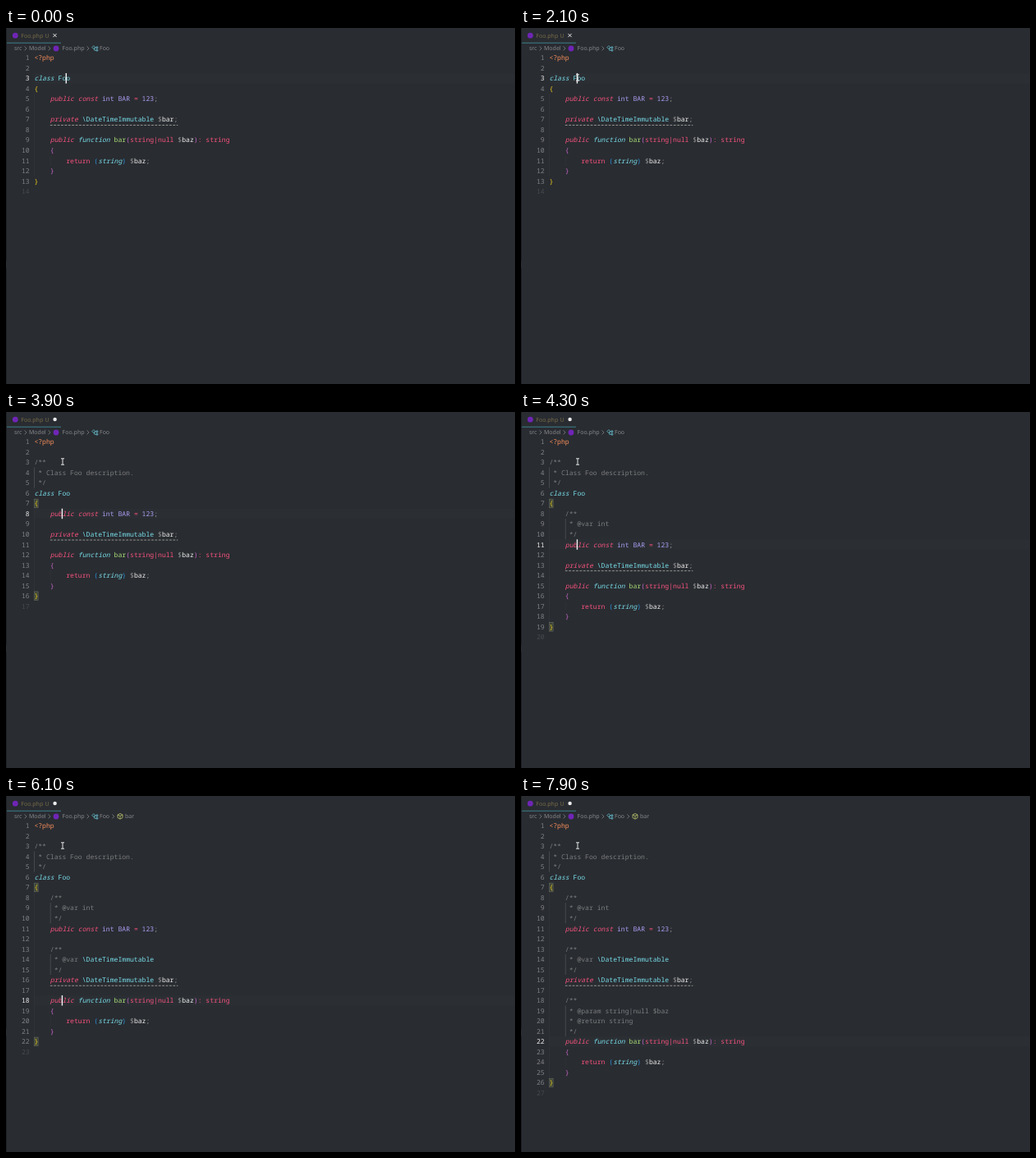
An HTML page for the animation above (8000 ms loop, 620x434 px).

```html
<!DOCTYPE html>
<html lang="en">
<head>
<meta charset="utf-8">
<title>Doc block editor</title>
<style>
  html, body { margin: 0; width: 100%; height: 100%; overflow: hidden; background: #292c31; }
  svg { display: block; width: 620px; height: 434px; text-rendering: geometricPrecision; }
  .code text { font: 8.1px "Noto Sans Mono", "DejaVu Sans Mono", monospace; }
  .code .it { font-style: italic; }
  .ui text { font: 7px "Noto Sans", "Open Sans", sans-serif; fill: #85878a; }
  .ui .file { fill: #776b48; }
  .ui path { fill: none; stroke: #85878a; stroke-width: .8; }
</style>
</head>
<body>
<svg viewBox="0 0 620 434">
  <rect width="620" height="434" fill="#292c31"/>
  <path d="M.5 0V284M.5 293V434" stroke="#1d2024"/>
  <g class="ui">
    <rect x="1" y="17.7" width="66" height="1" fill="#3c7f8b"/>
    <circle cx="11.3" cy="9.2" r="3.4" fill="#6f25b5"/>
    <text class="file" x="18.3" y="11.7">Foo.php</text>
    <text class="file" x="47.5" y="11.7">U</text>
    <path id="close" d="M57.4 6.9l4.2 4.2m0-4.2l-4.2 4.2" style="stroke:#e6e6e6;stroke-width:1"/>
    <circle id="dirty" cx="59.6" cy="9" r="2.2" fill="#ececec"/>
    <text x="10" y="27.4">src</text>
    <text x="28" y="27.4">Model</text>
    <circle cx="61" cy="25" r="3.4" fill="#6f25b5"/>
    <text x="68.6" y="27.4">Foo.php</text>
    <text x="114" y="27.4">Foo</text>
    <path d="M22.6 22.4l2.4 2.5-2.4 2.5M51.6 22.4l2.4 2.5-2.4 2.5M98.6 22.4l2.4 2.5-2.4 2.5"/>
    <path d="M104.8 23.6l2-2 1.8 1.8-2 2zM108 24h2M107.6 24v3.2h2.4M110 22.9h1.8v1.8h-1.8zM110 26.2h1.8v1.8h-1.8z" style="stroke:#66bccb"/>
    <g id="member">
      <path d="M129.4 22.4l2.4 2.5-2.4 2.5"/>
      <path d="M139 21.4l3 1.5v3.6l-3 1.6-3-1.6v-3.6zM136 22.9l3 1.5 3-1.5M139 24.4v3.7" style="stroke:#b9c46c"/>
      <text x="145" y="27.4">bar</text>
    </g>
  </g>
  <g id="code" class="code"></g>
  <rect id="caret" width="1.4" height="12.53" fill="#f4f4f4"/>
  <path id="mouse" d="M-2-3.7H2M0-3.7V3.7M-2 3.7H2" fill="none" stroke="#e2e2e2"/>
</svg>
<script>
const LOOP = 8000, LEFT = 34.4, CHAR = 4.86, TOP = 30, ROW = 12.53, BASE = 9.2;
const $ = id => document.getElementById(id);
const colX = col => LEFT + col * CHAR;
const rowY = row => TOP + (row - 1) * ROW;

// "~x" switches to style x; capitals are italic
const INK = {
  o: '#f58e5c', c: '#78dce8', C: '#78dce8', p: '#f6527c', P: '#f6527c', u: '#ab9df2',
  n: '#a9dc76', g: '#909192', w: '#f0f0ee', y: '#f2cf1d', m: '#c766c8', b: '#2c93de', d: '#7b7d7e'
};
const SOURCE = [
  '~o<?php', '', '~Cclass ~cFoo', '~y{',
  '    ~Ppublic const ~uint BAR ~p= ~u123~g;', '',
  '    ~Pprivate ~c\\DateTimeImmutable ~g$~wbar~g;', '',
  '    ~Ppublic ~Cfunction ~nbar~m(~pstring|null ~g$~wbaz~m)~p: string',
  '    ~m{', '        ~preturn ~b(~Cstring~b) ~g$~wbaz~g;', '    ~m}', '~y}', ''
];
const doc = (pad, ...body) =>
  ['/**', ...body.map(s => ' * ' + s), ' */'].map(s => {
    const indent = s.length - s.trimStart().length;
    return pad + ' '.repeat(indent) + '~d' + s.trimStart();
  });
const INSERTS = [
  { at: 3000, row: 3, lines: doc('', 'Class Foo description.') },
  { at: 4300, row: 8, lines: doc('    ', '@var int') },
  { at: 5300, row: 13, lines: doc('    ', '@var ~c\\DateTimeImmutable') },
  { at: 7100, row: 18, lines: doc('    ', '@param string|null $baz', '@return string') }
];
// time, row, column
const MOVES = [
  [-350, 3, 8], [2050, 3, 7], [3000, 6, 7], [3700, 7, 1], [3900, 8, 7], [4300, 11, 7],
  [4700, 12, 0], [4900, 13, 7], [5300, 16, 7], [5700, 17, 0], [5900, 18, 7], [7100, 22, 7]
];

const clamp = v => Math.min(1, Math.max(0, v));
const ease = v => { v = clamp(v); return v * v * (3 - 2 * v); };
const escape = s => s.replace(/&/g, '&amp;').replace(/</g, '&lt;');
const label = (x, y, fill, s, extra = '') =>
  `<text x="${x.toFixed(2)}" y="${y.toFixed(2)}" fill="${fill}" ${extra}>${escape(s)}</text>`;

function linesAt(t) {
  const lines = [...SOURCE];
  for (const ins of INSERTS) if (t >= ins.at) lines.splice(ins.row - 1, 0, ...ins.lines);
  return lines;
}

function drawLine(line, y) {
  let col = 0, out = '';
  line.split('~').forEach((part, i) => {
    const style = part[0], s = i ? part.slice(1) : part;
    if (s.trim()) out += label(colX(col), y, INK[style], s, /[A-Z]/.test(style) ? 'class="it"' : '');
    col += s.length;
  });
  return out;
}

function drawGuides(line, y, inside) {
  const indent = line ? line.search(/\S/) : inside ? 4 : 0;
  let out = '';
  for (let c = 0; c < indent; c += 4) {
    const bright = indent % 4 && c + 4 > indent;
    out += `<rect x="${colX(c)}" y="${y}" width=".6" height="${ROW}" fill="${bright ? '#5a5d60' : '#34373c'}"/>`;
  }
  return out;
}

function drawCode(t, active) {
  const lines = linesAt(t), last = lines.length, open = lines.indexOf('~y{') + 1, shut = last - 1;
  let out = `<rect x="${LEFT}" y="${rowY(active)}" width="586" height="${ROW}" fill="#2b2f34"/>`;
  lines.forEach((line, i) => {
    const row = i + 1, y = rowY(row), no = String(row);
    const ink = row === active ? '#ededed' : row === last ? '#474a4e' : '#808285';
    out += drawGuides(line, y, row > open && row < shut);
    if (t >= 3700 && (row === open || row === shut))
      out += `<rect x="${LEFT + .2}" y="${y + 1}" width="4.5" height="10.6" fill="#3b4437" stroke="#6b6d60" stroke-width=".6"/>`;
    out += label(28.7, y + BASE, ink, no, 'text-anchor="end"') + drawLine(line, y + BASE);
    if (line.includes('private'))
      out += `<path d="M${colX(4)} ${y + 13.3}H${colX(36)}" stroke="#a1a19b" stroke-width=".9" stroke-dasharray="2.8 1.6"/>`;
  });
  return out;
}

function blink(age) {
  if (age < 500) return 1;
  const u = (age - 500) % 1000;
  return u < 500 ? 1 - ease((u - 100) / 200) : ease((u - 700) / 200);
}

function mouseAt(t) {
  const k = ease((t - 770) / 830), drop = ease((t - 1600) / 450);
  return [388 - 319 * k, 184.5 - 108.5 * k - 15.5 * drop];
}

const show = (id, on) => { $(id).style.display = on ? '' : 'none'; };
let shown = '';

function frame(now) {
  const t = now % LOOP;
  const [since, row, col] = MOVES.filter(m => m[0] <= t).pop();
  const key = since + '/' + row;
  if (key !== shown) {
    $('code').innerHTML = drawCode(t, row);
    shown = key;
  }
  $('caret').setAttribute('x', colX(col) - .7);
  $('caret').setAttribute('y', rowY(row));
  $('caret').setAttribute('opacity', blink(t - since));
  $('mouse').setAttribute('transform', `translate(${mouseAt(t)})`);
  show('mouse', t >= 800);
  show('close', t < 3000);
  show('dirty', t >= 3000);
  show('member', t >= 6100);
}

const start = performance.now();
function tick() {
  frame(performance.now() - start);
  requestAnimationFrame(tick);
}
tick();
</script>
</body>
</html>
```
